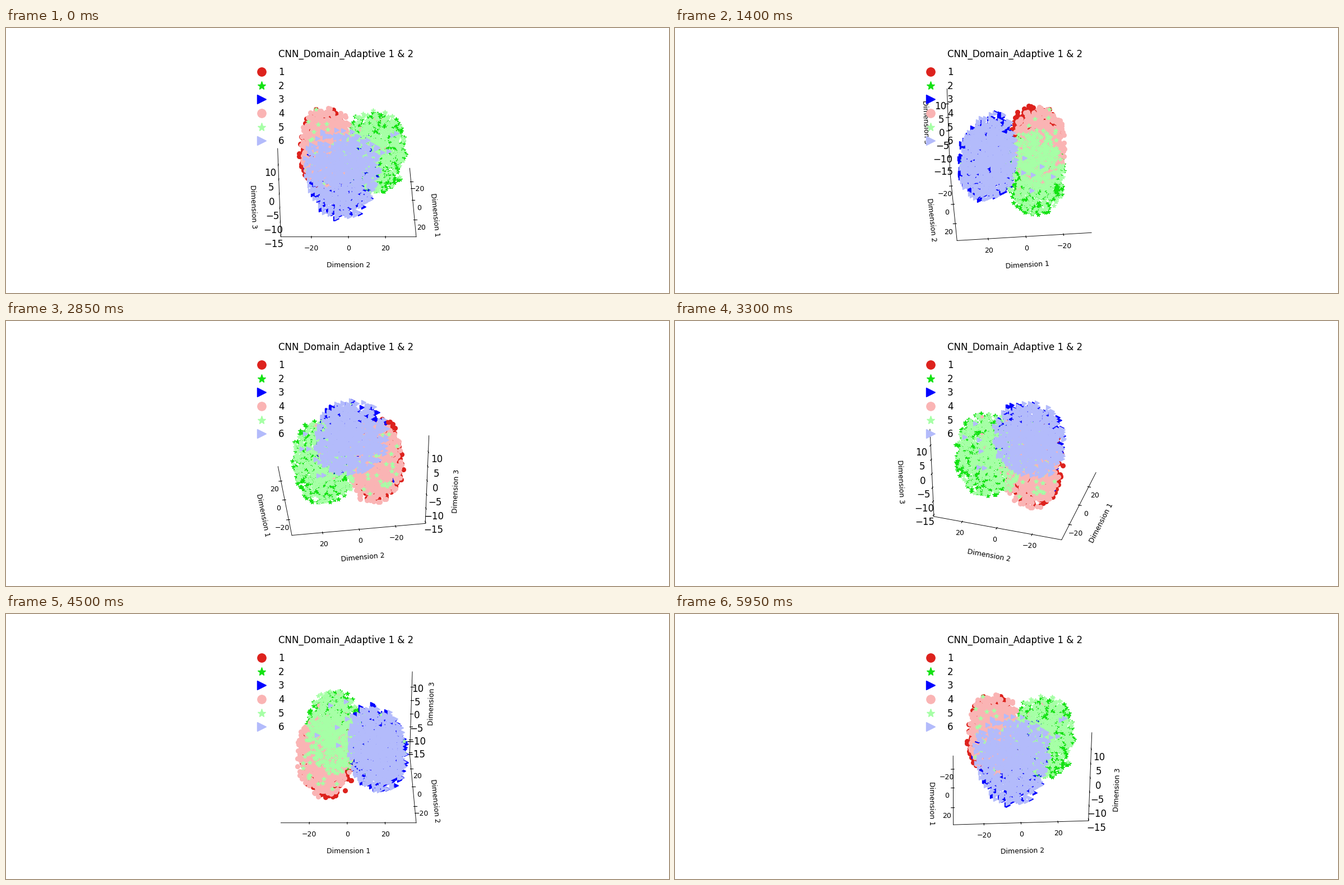
Animation of 1183 by 473 pixels, one loop 6 s. Source, as a matplotlib script:

```python
import numpy as np
import matplotlib.pyplot as plt
from matplotlib.animation import FuncAnimation

W, H, DPI = 1183, 473, 100
FRAMES, LOOP_MS = 120, 6000

LIMITS = np.array([[-35.0, 36.4], [-36.5, 36.6], [-15.64, 15.45]])
BOX = np.array([1.1905, 1.1905, 0.8929])   # drawn size of the axes box

# label, marker, colour, count
GROUPS = [
    ("1", "o", "#dd221d", 600),
    ("2", "*", "#13e213", 700),
    ("3", ">", "#0404ff", 650),
    ("4", "o", "#fab4b4", 700),
    ("5", "*", "#a6ffa6", 600),
    ("6", ">", "#b3bbfb", 780),
]

# centre and half-axes of each lobe, in box units
RED = ((-0.22, -0.20, 0.0), (0.24, 0.24, 0.385))
GREEN = ((-0.135, 0.23, 0.0), (0.25, 0.285, 0.395))
BLUE = ((0.258, -0.056, 0.0), (0.26, 0.31, 0.38))
LOBES = [RED, GREEN, BLUE]

# how far the first domain sits outside the second one
SHIFT = [(0.035, -0.025, 0.01), (0.0, 0.015, 0.0), (0.012, 0.0, 0.0)]

# stray points: group index -> (lobe, count)
STRAYS = {2: [(RED, 6)], 3: [(GREEN, 12)], 4: [(RED, 32), (BLUE, 10)],
          5: [(GREEN, 6)]}

rng = np.random.default_rng(12)


def lobe_points(lobe, n):
    """Points spread through a slightly boxy ellipsoid."""
    centre, half = lobe
    d = rng.normal(size=(n, 3))
    d /= np.linalg.norm(d, ord=2.5, axis=1, keepdims=True)
    d *= rng.random((n, 1)) ** 0.38
    if lobe is BLUE:        # narrows and dips towards its outer end
        d[:, 1] *= 1 - 0.33 * d[:, 0]
        d[:, 2] -= 0.2 * d[:, 0]
    return np.array(centre) + d * np.array(half)


def to_data(p):
    span = LIMITS[:, 1] - LIMITS[:, 0]
    return LIMITS.mean(axis=1) + p * span / BOX


def group_points(k, n):
    pts = lobe_points(LOBES[k % 3], n)
    if k < 3:
        pts = pts + np.array(SHIFT[k])
    extra = [lobe_points(lobe, m) for lobe, m in STRAYS.get(k, [])]
    return to_data(np.vstack([pts] + extra))


fig = plt.figure(figsize=(W / DPI, (H + 0.01) / DPI), dpi=DPI, facecolor="white")
ax = fig.add_subplot(projection="3d")

for k, (name, marker, color, n) in enumerate(GROUPS):
    x, y, z = group_points(k, n).T
    ax.plot(x, y, z, linestyle="none", marker=marker, color=color,
            markersize=5.5, markeredgewidth=1, label=name)

ax.set_xlim(*LIMITS[0])
ax.set_ylim(*LIMITS[1])
ax.set_zlim(*LIMITS[2])
ax.set_xticks([-20, 0, 20])
ax.set_yticks([-20, 0, 20])
ax.set_zticks([-15, -10, -5, 0, 5, 10])
ax.grid(False)

for k, axis in enumerate((ax.xaxis, ax.yaxis, ax.zaxis), 1):
    axis.pane.set_visible(False)
    axis.line.set_linewidth(0.65)
    axis.set_label_text(f"Dimension {k}", fontsize=9)
    axis.labelpad = 3
    axis.set_tick_params(pad=-1, labelsize=12 if k == 3 else 9)
    for tick in axis.get_major_ticks():
        tick.label1.set(va="top", ha="center")

fig.text(606.3 / W, 1 - 52 / H, "CNN_Domain_Adaptive 1 & 2", fontsize=12,
         ha="center", va="baseline")
ax.legend(loc="upper left", bbox_to_anchor=(0, 1.005), fontsize=12,
          frameon=False, markerscale=2, labelspacing=0.4)


def update(i):
    # the tiny offset settles which edges carry the axes at right angles
    ax.view_init(elev=30, azim=i * 360 / FRAMES + 1e-4)
    return []


anim = FuncAnimation(fig, update, frames=FRAMES, interval=LOOP_MS / FRAMES,
                     repeat=True, blit=False)
plt.show()
```
